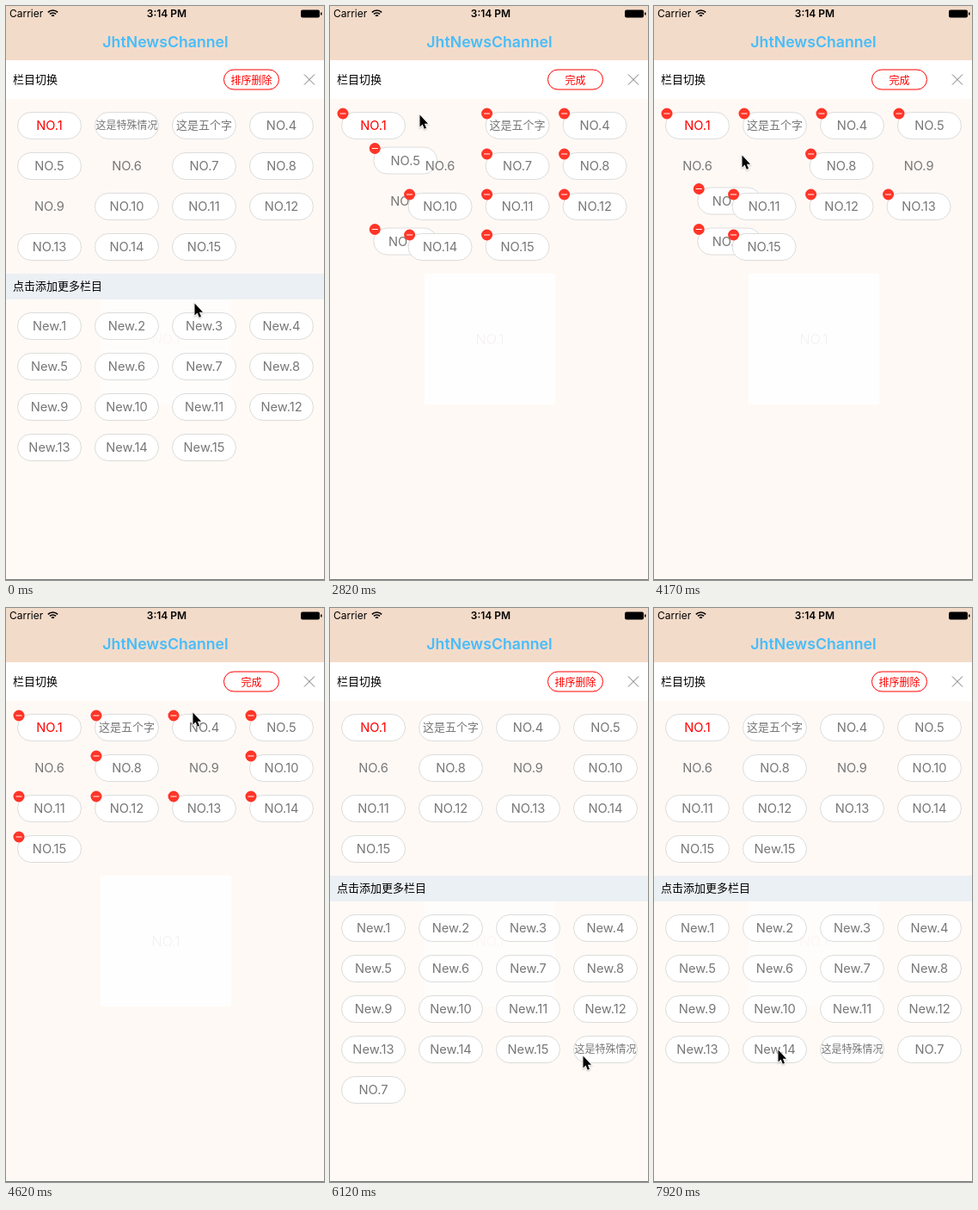
An HTML page with a canvas for the animation above (8 s loop, 370 px wide and 667 px high).

```html
<!DOCTYPE html>
<html lang="zh">
<head>
<meta charset="utf-8">
<title>JhtNewsChannel</title>
<style>
  html, body { margin: 0; width: 100%; height: 100%; overflow: hidden; background: #fff9f5; }
  canvas { display: block; }
</style>
</head>
<body>
<canvas id="stage" width="370" height="667"></canvas>
<script>
const ctx = document.getElementById('stage').getContext('2d');
const FONT = 'Inter, "Noto Sans CJK SC", "Noto Sans CJK", sans-serif';
const LOOP = 8000, RED = '#ff0000', GREY = '#777';
const EDIT_ON = 1620, EDIT_OFF = 5370, FLY = 6770;
const SPECIAL = '这是特殊情况';
const UPPER_TOP = 139, LOWER_TOP = 372;

const upper = Array.from({ length: 15 }, (_, i) => 'NO.' + (i + 1));
upper[1] = SPECIAL;
upper[2] = '这是五个字';
const lower = Array.from({ length: 15 }, (_, i) => 'New.' + (i + 1)).concat(SPECIAL, 'NO.7');
const fixed = ['NO.6', 'NO.9'];

// Removed items: [index, start time]
const upperDrops = [[1, 2750], [6, 4100]];
const lowerDrops = [[14, 7250]];

// Pointer path: [time, x, y]
const path = [
  [0, 219, 345], [140, 230, 305], [290, 237, 274], [440, 237, 274],
  [740, 249, 215], [1040, 277, 120], [1320, 266, 86], [1620, 266, 86],
  [2070, 160, 106], [2370, 104, 126], [2970, 104, 126], [3270, 91, 145],
  [3570, 99, 174], [3720, 99, 174], [3870, 102, 173], [4170, 102, 173],
  [4620, 217, 121], [5070, 270, 90], [5220, 277, 86], [5370, 277, 86],
  [6120, 294, 520], [6570, 247, 512], [7170, 247, 512], [7920, 144, 513], [LOOP, 144, 513]
];
const arrow = new Path2D('M.5 .5V14.5L3.6 11.6L5.8 16.7L8 15.7L5.9 10.8H10Z');

const mix = (a, b, p) => a + (b - a) * p;
const ease = (t, start, span) => {
  const p = Math.min(1, Math.max(0, (t - start) / span));
  return p * p * (3 - 2 * p);
};

function rect(x, y, w, h, color) {
  ctx.fillStyle = color;
  ctx.fillRect(x, y, w, h);
}

function text(str, x, y, size, color, align = 'center', weight = 400) {
  ctx.font = `${weight} ${size}px ${FONT}`;
  ctx.textAlign = align;
  ctx.fillStyle = color;
  ctx.fillText(str, x, y + size * 0.34);
}

function capsule(x, y, w, h, fill, line) {
  ctx.beginPath();
  ctx.roundRect(x - w / 2 + 0.5, y - h / 2 + 0.5, w - 1, h - 1, (h - 1) / 2);
  ctx.fillStyle = fill;
  ctx.fill();
  if (!line) return;
  ctx.strokeStyle = line;
  ctx.lineWidth = 1;
  ctx.stroke();
}

function pill(name, x, y) {
  const size = name === SPECIAL ? 12 : name[0] === '这' ? 13 : 14.7;
  if (!fixed.includes(name)) capsule(x, y, 75, 32, '#fff', '#dcdcdc');
  text(name, x, y, size, name === 'NO.1' ? RED : GREY);
}

// The minus sign is a slit in the disc.
function badge(x, y, alpha) {
  ctx.globalAlpha = alpha;
  ctx.beginPath();
  ctx.arc(x - 35.5, y - 14, 6.5, 0, 7);
  ctx.rect(x - 39, y - 14.4, 7, 0.8);
  ctx.fillStyle = '#ff3528';
  ctx.fill('evenodd');
  ctx.globalAlpha = 1;
}

const slot = (i, top) => [50.5 + 90 * (i % 4), top + 47 * Math.floor(i / 4)];

function grid(names, top, drops, t, draw) {
  names.forEach((name, i) => {
    if (drops.some(([k, start]) => k === i && t > start)) return;
    const pos = drops.reduce((p, [k, start]) => k < i ? p - ease(t, start, 300) : p, i);
    const from = slot(Math.floor(pos), top), to = slot(Math.ceil(pos), top);
    draw(name, mix(from[0], to[0], pos % 1), mix(from[1], to[1], pos % 1));
  });
}

function statusBar() {
  rect(0, 0, 370, 63, '#f3dbc9');
  text('Carrier', 4, 9, 12, '#000', 'left');
  text('3:14 PM', 187, 9, 12, '#000', 'center', 600);
  ctx.strokeStyle = '#000';
  ctx.lineWidth = 1.7;
  for (const r of [2, 5, 8]) {
    ctx.beginPath();
    ctx.arc(54.5, 13, r, -Math.PI * 0.75, -Math.PI * 0.25);
    ctx.stroke();
  }
  ctx.beginPath();
  ctx.roundRect(343, 4.5, 22, 9, 2);
  ctx.fillStyle = '#000';
  ctx.fill();
  rect(366, 7.5, 1.5, 3, '#000');
  text('JhtNewsChannel', 185.5, 42, 17.7, '#47bdfb', 'center', 600);
}

function toolbar(editing) {
  rect(0, 63, 370, 45, '#fff');
  text('栏目切换', 8, 85.5, 13, '#000', 'left');
  capsule(285.5, 85.5, 65, 24, '#fff', RED);
  text(editing ? '完成' : '排序删除', 285.5, 86.6, 12, RED);
  ctx.strokeStyle = GREY;
  ctx.lineWidth = 1;
  ctx.beginPath();
  ctx.moveTo(347, 79.5); ctx.lineTo(359, 91.5);
  ctx.moveTo(359, 79.5); ctx.lineTo(347, 91.5);
  ctx.stroke();
}

function pointer(t) {
  const i = path.findIndex(key => key[0] > t);
  const a = path[i - 1], b = path[i];
  const p = (t - a[0]) / (b[0] - a[0]);
  ctx.save();
  ctx.translate(mix(a[1], b[1], p), mix(a[2], b[2], p));
  ctx.shadowColor = 'rgba(0,0,0,.25)';
  ctx.shadowBlur = 2;
  ctx.shadowOffsetY = 1;
  ctx.strokeStyle = '#fff';
  ctx.lineWidth = 1.6;
  ctx.stroke(arrow);
  ctx.shadowColor = 'transparent';
  ctx.fillStyle = '#000';
  ctx.fill(arrow);
  ctx.restore();
}

function lowerSection(t) {
  rect(0, 341, 370, 326, 'rgba(255,249,245,.4)');
  rect(0, 311, 370, 30, '#ebf0f4');
  text('点击添加更多栏目', 8, 326, 13, '#000', 'left');
  const names = t < EDIT_ON ? lower.slice(0, 15) : lower;
  grid(names, LOWER_TOP, lowerDrops, t, (name, x, y) => {
    if (name === 'New.15' && t > FLY) capsule(x, y, 75, 32, '#f2ede9');
    else pill(name, x, y);
  });
}

function draw(t) {
  const editing = t >= EDIT_ON && t < EDIT_OFF;
  rect(0, 0, 370, 667, '#fff9f5');
  rect(110, 311, 152, 152, '#fffefe');
  text('NO.1', 186, 387.5, 16, '#f3f1f0', 'center', 300);
  statusBar();
  toolbar(editing);

  const alpha = ease(t, 1490, 400) - ease(t, 5330, 400);
  grid(upper, UPPER_TOP, upperDrops, t, (name, x, y) => {
    pill(name, x, y);
    if (t >= EDIT_ON && alpha > 0 && !fixed.includes(name)) badge(x, y, alpha);
  });
  if (!editing) lowerSection(t);

  if (t > FLY) {
    const p = ease(t, FLY, 400);
    const from = slot(14, LOWER_TOP), to = slot(13, UPPER_TOP);
    pill('New.15', mix(from[0], to[0], p), mix(from[1], to[1], p));
  }
  rect(0, 666, 370, 1, '#777');
  pointer(t);
}

// The screen refreshes every 150 ms, with one shorter step before 1320 ms.
function tick(t) {
  if (t < 140) return 0;
  const base = t < 1320 ? 140 : 1320;
  return base + 150 * Math.floor((t - base) / 150);
}

function frame() {
  draw(tick(performance.now() % LOOP));
  requestAnimationFrame(frame);
}
frame();
</script>
</body>
</html>
```
